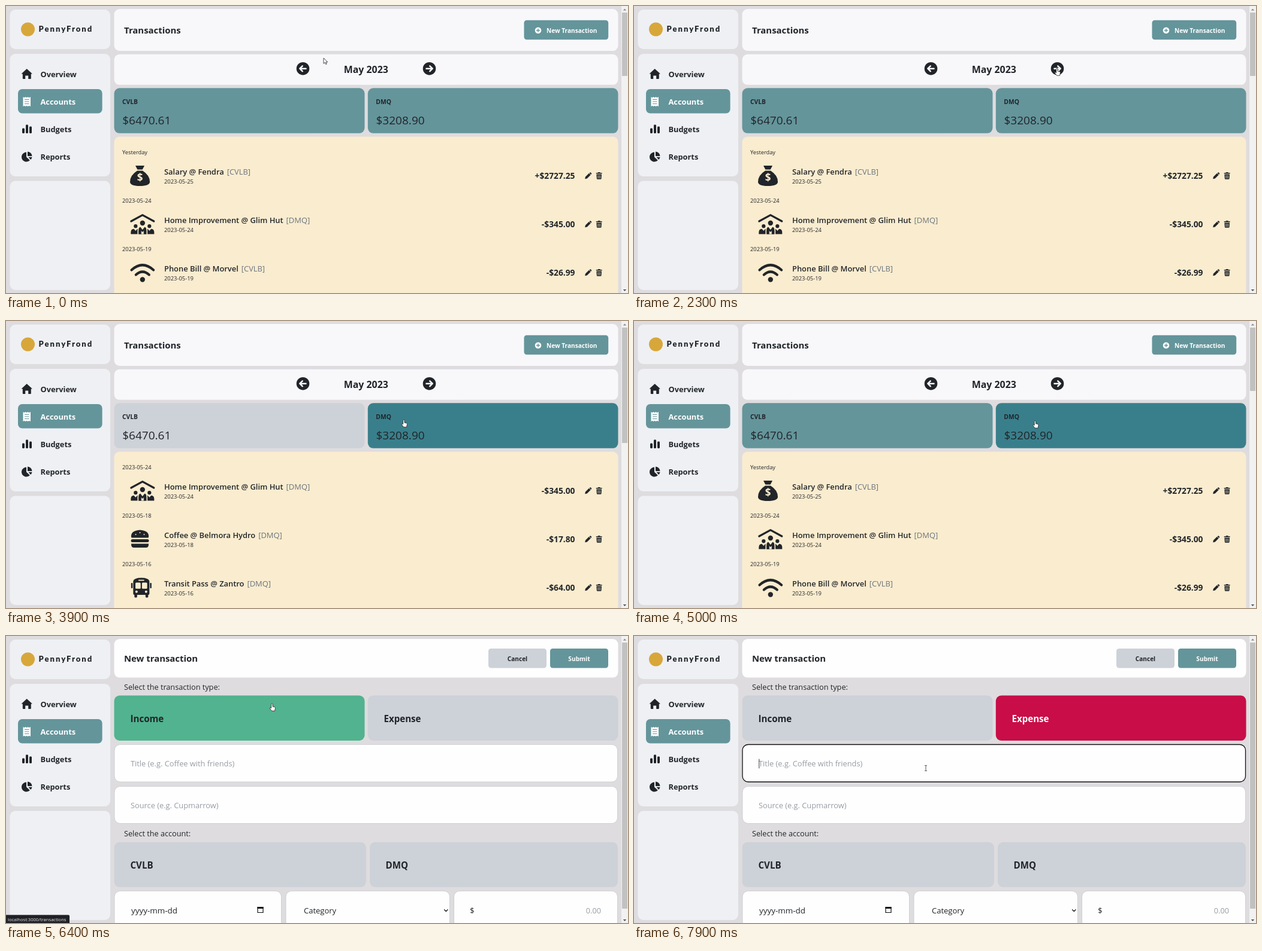
Recreate the animation shown at these times as an HTML page. Size 1038 by 480 pixels, loop 8000 ms.

```html
<!DOCTYPE html>
<html lang="en">
<head>
<meta charset="utf-8">
<title>Budget tracker</title>
<style>
  html, body { margin: 0; width: 100%; height: 100%; overflow: hidden; background: #dedcde; }
  svg { display: block; width: 1038px; height: 480px; }
  text { font-family: "Open Sans", "Noto Sans", sans-serif; white-space: pre; }
  .brand { font-family: Lato, sans-serif; letter-spacing: 2px; }
</style>
</head>
<body>
<svg id="stage" viewBox="0 0 1038 480" xmlns="http://www.w3.org/2000/svg"></svg>
<script>
const LOOP = 8000, STEP = 100;
const INK = '#212529', TEAL = '#64959b', DEEP = '#397f8b', GREY = '#cdd1d8',
      PANEL = '#eef0f4', HEAD = '#f8f8fb', CREAM = '#faeccf', MUTED = '#6c757d',
      GREEN = '#51b38f', RED = '#c80d48', HINT = '#989da4';
const BANK_A = 'CVLB', BANK_B = 'DMQ';
// Shared column edges
const LEFT = 180.5, MID_L = 598.5, MID_R = 603.8, RIGHT = 1021.5;

// Drawing helpers
const box = (x, y, x2, y2, r, fill, more = '') =>
  `<rect x="${x}" y="${y}" width="${x2 - x}" height="${y2 - y}" rx="${r}" fill="${fill}" ${more}/>`;
const text = (x, y, size, str, { w = 400, fill = INK, end = '', more = '' } = {}) =>
  `<text x="${x}" y="${y}" font-size="${size}" font-weight="${w}" fill="${fill}" ${end && `text-anchor="${end}"`} ${more}>${str}</text>`;
const bold = (x, y, size, str, opt = {}) => text(x, y, size, str, { w: 700, ...opt });
const path = (d, fill = INK, more = '') => `<path d="${d}" fill="${fill}" ${more}/>`;
const line = (d, width, color = INK) =>
  path(d, 'none', `stroke="${color}" stroke-width="${width}" stroke-linecap="round" stroke-linejoin="round"`);
const dot = (x, y, r, fill = INK) => `<circle cx="${x}" cy="${y}" r="${r}" fill="${fill}"/>`;
const at = (x, y, body) => `<g transform="translate(${x} ${y})">${body}</g>`;
const layer = (id, body) => `<g id="${id}">${body}</g>`;

const sidePerson = x => dot(x, 3.2, 3.1) + path(`M${x - 8} 16.5V13.5Q${x - 8} 8 ${x - 3} 7.7L${x} 11 ${x + 3} 7.7Q${x + 8} 8 ${x + 8} 13.5V16.5z`);

// Category icons, centred on the origin
const icons = {
  bag: path('M-7.5-17H7.5L4.2-10.5H-4.2z') +
    path('M-4.5-8.5H4.5Q16.5-1 16.5 10Q16.5 17-.5 17Q-16.5 17-16.5 10Q-16.5-1-4.5-8.5z') +
    bold(0, 9.2, 17, '$', { fill: CREAM, end: 'middle' }),
  home: at(4.3, 0, line('M-19-5L0-15.3 19-5', 3.2) + sidePerson(-11.5) + sidePerson(11.5) +
    dot(0, -2, 4.2) +
    path('M-7.5 17.5V11Q-7.5 4-3.2 3.7L0 8 3.2 3.7Q7.5 4 7.5 11V17.5z', INK, `stroke="${CREAM}" stroke-width="1.6"`) +
    path('M-2 11L0 13.2 2 11V16.5H-2z', CREAM)),
  wifi: at(4.3, 0, line('M-18.3-4.5Q0-21 18.3-4.5', 4.2) + line('M-11 3.5Q0-6.5 11 3.5', 4.2) + dot(0, 11.5, 4.2)),
  burger: path('M-14.5-3.5Q-16-14.5 0-15.5Q16-14.5 14.5-3.5Q14.5-2.5 13-2.5H-13Q-14.5-2.5-14.5-3.5z') +
    [[-7, -8], [0, -11], [7, -8]].map(p => dot(...p, 1, CREAM)).join('') +
    box(-15, 0, 15, 5, 2.5, INK) + path('M-14.5 7.5H14.5V9Q14.5 14 10 14H-10Q-14.5 14-14.5 9z'),
  bus: at(2.3, 0, path('M-13.5-11Q-12-16.5 0-16.5T13.5-11V10Q13.5 12 11.5 12H-11.5Q-13.5 12-13.5 10z') +
    box(-17, -8, -14.5, 1, 1.2, INK) + box(14.5, -8, 17, 1, 1.2, INK) +
    box(-11.5, 10, -7, 16.5, 1.5, INK) + box(7, 10, 11.5, 16.5, 1.5, INK) +
    box(-5, -13.3, 5, -11.5, .9, CREAM) + box(-9.8, -8.5, -1.1, 1.8, 1.5, CREAM) + box(1.1, -8.5, 9.8, 1.8, 1.5, CREAM) +
    dot(-8, 6.7, 2, CREAM) + dot(8, 6.7, 2, CREAM))
};
const pencil = path('M-5.3 5.3L-4.6 1.8 1.4-4.2 4.2-1.4-1.8 4.6z') + path('M2-4.8L3.2-5.6Q4-6 5-5T5.6-3.2L4.8-2z');
const trash = box(-5, -5, 5, -3.4, .6, INK) + box(-1.9, -6, 1.9, -4, .6, INK) +
  path('M-4.3-2.5H4.3L3.8 4.8Q3.7 5.8 2.8 5.8H-2.8Q-3.7 5.8-3.8 4.8z') +
  line('M-2-.5V4M0-.5V4M2-.5V4', .7, CREAM);

// Transactions: [icon, title, bank, amount], grouped by day
const salary = ['bag', 'Salary @ Fendra', BANK_A, '+$2727.25'];
const repair = ['home', 'Home Improvement @ Glim Hut', BANK_B, '-$345.00'];
const phone = ['wifi', 'Phone Bill @ Morvel', BANK_A, '-$26.99'];
const coffee = ['burger', 'Coffee @ Belmora Hydro', BANK_B, '-$17.80'];
const blender = ['home', 'Blender @ Trevask', BANK_A, '-$78.00'];
const pass = ['bus', 'Transit Pass @ Zantro', BANK_B, '-$64.00'];
const pay = ['bag', 'Salary @ Fendra', BANK_B, '+$2835.25'];
const lists = {
  may: [['Yesterday', salary], ['2023-05-24', repair], ['2023-05-19', phone]],
  april: [['2023-04-18', coffee], ['2023-04-17', blender, pay], ['2023-04-16']],
  bankA: [['Yesterday', salary], ['2023-05-19', phone], ['2023-05-17', blender]],
  bankB: [['2023-05-24', repair], ['2023-05-18', coffee], ['2023-05-16', pass]]
};
const thumbEnd = { may: 117, april: 131, bankA: 150, bankB: 204, form: 456 };

function drawRow(y, date, [icon, title, bank, amount]) {
  return at(223.5, y, icons[icon]) +
    text(264, y - 2, 12.9, `${title}<tspan dx="5" font-weight="400" fill="${MUTED}">[${bank}]</tspan>`, { w: 600 }) +
    text(264, y + 13, 9.4, date) +
    bold(949.5, y + 5, 13.8, amount, { end: 'end' }) +
    at(971.5, y, pencil) + at(989.7, y, trash);
}
function drawList(groups) {
  let y = 245, out = '';
  for (const [label, ...rows] of groups) {
    out += text(194, y + 3.3, 9.3, label);
    rows.forEach((row, i) => out += drawRow(y + 39 + i * 62, label === 'Yesterday' ? '2023-05-25' : label, row));
    y += 19 + rows.length * 62;
  }
  return out;
}

const roundArrow = (x, dir) => at(x, 104.7, dot(0, 0, 10.8) +
  `<g transform="scale(${dir} 1)">${line('M-5 0H5M.8-4.4L5.2 0 .8 4.4', 2.5, HEAD)}</g>`);
const card = (id, x, x2, name, sum) => box(x, 137.3, x2, 212.8, 9, TEAL, `id="${id}"`) +
  bold(x + 13.5, 163.5, 10.3, name) + text(x + 13.7, 198, 19, sum);
const field = (x, y, x2, y2, id = '') =>
  box(x + .5, y + .5, x2 - .5, y2 - .5, 9.5, '#fefefe', `stroke="#ced1d6" ${id && `id="${id}"`}`);

const sidebar =
  box(6.5, 6, 174, 72, 9, PANEL) + box(6.5, 80, 174, 285, 9, PANEL) + box(6.5, 292.5, 174, 475, 9, PANEL) +
  dot(36.5, 39, 11.5, '#d8a73a') +
  text(54.5, 42.5, 13, 'PennyFrond', { w: 900, more: 'class="brand"' }) +
  box(20, 139, 160.6, 179.6, 7, TEAL) +
  path('M34.7 105L44 113.5H41.8V121Q41.8 122 40.8 122H37.2V116.5H32.2V122H28.8Q27.8 122 27.8 121V113.5H25.5z') +
  path('M28.5 152l2 1.2 2-1.2 2 1.2 2-1.2 2 1.2 2.5-1.2V168l-2.5-1.2-2 1.2-2-1.2-2 1.2-2-1.2-2 1.2z', '#fff') +
  line('M31.5 156.5H38M31.5 160H38M31.5 163.5H38', 1.2, TEAL) +
  box(27, 204.5, 31, 213, 1.4, INK) + box(33, 198.5, 37, 213, 1.4, INK) + box(39, 201.5, 43, 213, 1.4, INK) +
  path('M34 244.5V252.5L39.8 258A8 8 0 1 1 34 244.5z') + path('M36 243.5A8 8 0 0 1 43.5 251H36z') +
  path('M37.5 252.7H43.5A8 8 0 0 1 41.2 257z') +
  ['Overview', 'Accounts', 'Budgets', 'Reports'].map((s, i) =>
    bold(57.5, 118.7 + 46 * i, 12.8, s, { fill: i === 1 ? '#fff' : INK })).join('');

const ledger =
  box(LEFT, 5, RIGHT, 75, 9, HEAD) + bold(197, 46, 14.9, 'Transactions') +
  box(864.5, 23.8, 1005.2, 56.2, 4.5, TEAL, 'id="add"') + dot(888, 40.7, 5.3, '#fff') +
  line('M885.5 40.7H890.5M888 38.2V43.2', 1.4, TEAL) +
  bold(902, 44.6, 10.1, 'New Transaction', { fill: '#fff' }) +
  box(LEFT, 80.8, RIGHT, 131.8, 9, HEAD) + roundArrow(495.5, -1) + roundArrow(706.5, 1) +
  bold(600.8, 112.4, 15.9, '', { end: 'middle', more: 'id="month"' }) +
  card('cardA', LEFT, MID_L, BANK_A, '$6470.61') + card('cardB', MID_R, RIGHT, BANK_B, '$3208.90') +
  box(LEFT, 218.6, RIGHT, 500, 9, CREAM) +
  Object.keys(lists).map(k => layer(k, drawList(lists[k]))).join('');

const form =
  box(LEFT, 5, RIGHT, 69.6, 9, '#fefefe') + bold(197, 43.4, 14.9, 'New transaction') +
  box(805, 21, 902, 53.5, 4.5, GREY) + bold(853.5, 41.5, 10.1, 'Cancel', { end: 'middle' }) +
  box(908, 21, 1005, 53.5, 4.5, TEAL) + bold(956.5, 41.5, 10.2, 'Submit', { end: 'middle', fill: '#fff' }) +
  text(197, 90, 12.7, 'Select the transaction type:') +
  box(LEFT, 99.5, MID_L, 175, 9, GREY, 'id="income"') + bold(207.5, 143.8, 15.1, 'Income') +
  box(MID_R, 99.5, RIGHT, 175, 9, GREY, 'id="expense"') + bold(630.5, 143.8, 15.1, 'Expense', { more: 'id="expenseText"' }) +
  field(LEFT, 181, 1021, 244.5, 'title') + text(208, 218.3, 12.8, 'Title (e.g. Coffee with friends)', { fill: HINT }) +
  layer('caret', line('M208.8 206V221', .9)) +
  field(LEFT, 251, 1021, 314) + text(208, 288, 12.8, 'Source (e.g. Cupmarrow)', { fill: HINT }) +
  text(197, 335, 12.7, 'Select the account:') +
  box(LEFT, 344.8, 601, 420, 9, GREY) + bold(207.5, 388.5, 15.1, BANK_A) +
  box(607, 344.8, 1021, 420, 9, GREY) + bold(633.5, 388.5, 15.1, BANK_B) +
  field(LEFT, 426, 460, 500) + text(209, 463.5, 13.4, 'yyyy-mm-dd') +
  path('M420 453.5H429V462.5H420z', 'none', 'stroke="#111" stroke-width="1.2"') + box(419.5, 453, 429.5, 456, 0, '#111') +
  field(466.5, 426, 741, 500) + text(497, 463.5, 13, 'Category') + line('M731.5 457.7L734.3 460.5 737 457.7', 1.4) +
  field(747, 426, 1021, 500) + text(774, 463.5, 13.4, '$') + text(993, 463.5, 12.7, '0.00', { end: 'end', fill: HINT });

const scrollbar = box(1027, 0, 1038, 480, 0, '#f1f1f1') + box(1028, 11, 1037, 117, 0, '#c1c1c1', 'id="thumb"') +
  path('M1029.8 7.5L1032.5 4.5 1035.2 7.5z', '#8a8a8a') + path('M1029.8 474L1032.5 477 1035.2 474z', '#505050');
const status = layer('status', box(-4, 466.5, 122, 490, 2, '#202124', 'id="statusBox"') +
  text(3, 476.8, 7.6, '', { fill: '#e8eaed', more: 'id="statusText"' }));
const outline = 'stroke="#222" stroke-width=".8" stroke-linejoin="round"';
const pointers =
  layer('arrow', path('M0 0V9.3L2.2 7.4 3.8 10.6 5.3 9.9 3.8 6.8H6.7z', '#fff', outline)) +
  layer('hand', path('M-.4.5a1.2 1.2 0 0 1 2.4 0V4L5.4 4.8Q6.6 5.1 6.4 6.5L5.6 11.3H.6L-2.8 7.1Q-3.1 5.7-1.9 5.8L-.4 6.8z', '#fff', outline)) +
  layer('beam', line('M-1.6-4.5H-.4L0-4 .4-4.5H1.6M0-4V4M-1.6 4.5H-.4L0 4 .4 4.5H1.6', .9, '#444'));

document.getElementById('stage').innerHTML = box(0, 0, 1038, 480, 0, '#dedcde') + sidebar +
  layer('ledger', ledger) + layer('form', form) + scrollbar + status + layer('pointer', pointers);

const $ = Object.fromEntries([...document.querySelectorAll('#stage [id]')].map(e => [e.id, e]));
const show = (id, on) => $[id].setAttribute('display', on ? 'inline' : 'none');
const fill = (id, color) => $[id].setAttribute('fill', color);

// Pointer hot spot: time, x, y
const moves = [
  [0, 530, 87], [500, 497, 104], [1000, 497, 104], [1400, 587, 107], [1800, 705, 105], [2400, 705, 105],
  [3100, 511, 158], [3500, 511, 160], [3800, 655, 165], [3900, 663, 166], [4900, 668, 168], [5300, 672, 166],
  [6000, 884, 43], [6100, 881, 42], [6200, 872, 43], [6400, 443, 114], [6600, 446, 117], [7000, 640, 132],
  [7200, 648, 134], [7600, 492, 215], [7900, 487, 221]
];
// View changes on click
const views = [[0, 'may'], [1000, 'april'], [2200, 'may'], [3300, 'bankA'], [3900, 'bankB'], [4900, 'may'], [6200, 'form']];

function pointerAt(t) {
  const i = moves.findIndex(m => m[0] > t);
  if (i < 0) return moves[moves.length - 1].slice(1);
  const [t0, x0, y0] = moves[i - 1], [t1, x1, y1] = moves[i];
  const p = (t - t0) / (t1 - t0), e = p * p * (3 - 2 * p);
  return [x0 + (x1 - x0) * e, y0 + (y1 - y0) * e];
}

function render(t) {
  const view = views.filter(v => v[0] <= t).pop()[1], isForm = view === 'form';
  const [x, y] = pointerAt(t);
  const over = (a, b, c, d) => x >= a && y >= b && x <= c && y <= d;
  const overA = !isForm && over(LEFT, 137, MID_L, 213), overB = !isForm && over(MID_R, 137, RIGHT, 213);
  const overAdd = !isForm && over(865, 24, 1005, 56);
  const overArrow = !isForm && [495.5, 706.5].some(cx => Math.hypot(x - cx, y - 104.7) < 11);
  const overForm = isForm && (over(805, 21, 1005, 53) || over(LEFT, 99, MID_L, 175) || over(MID_R, 99, RIGHT, 175));
  const overText = isForm ? over(LEFT, 181, 1021, 244) || over(197, 80, 358, 94) : over(561, 97, 640, 117);

  show('ledger', !isForm);
  show('form', isForm);
  Object.keys(lists).forEach(k => show(k, k === view));
  $.month.textContent = view === 'april' ? 'April 2023' : 'May 2023';
  fill('cardA', overA ? DEEP : view === 'bankB' ? GREY : TEAL);
  fill('cardB', overB ? DEEP : view === 'bankA' ? GREY : TEAL);
  fill('add', overAdd ? DEEP : TEAL);
  $.thumb.setAttribute('height', thumbEnd[view] - 11);

  const expense = t >= 7100, focus = t >= 7600;
  fill('income', t >= 6400 && !expense ? GREEN : GREY);
  fill('expense', expense ? RED : GREY);
  fill('expenseText', expense ? '#fff' : INK);
  $.title.setAttribute('stroke', focus ? '#111' : '#ced1d6');
  $.title.setAttribute('stroke-width', focus ? 1.3 : 1);
  show('caret', focus);

  show('status', overAdd || (isForm && t < 6600));
  $.statusText.textContent = 'localhost:3000/transactions' + (isForm ? '' : '/add');
  $.statusBox.setAttribute('width', isForm ? 110 : 126);

  const shape = overA || overB || overAdd || overArrow || overForm ? 'hand' : overText ? 'beam' : 'arrow';
  ['arrow', 'hand', 'beam'].forEach(s => show(s, s === shape));
  $.pointer.setAttribute('transform', `translate(${x.toFixed(1)} ${y.toFixed(1)})`);
}

const start = performance.now();
function tick(now) {
  const t = Math.max(0, now - start) % LOOP;
  render(Math.floor(t / STEP) * STEP);
  requestAnimationFrame(tick);
}
render(0);
requestAnimationFrame(tick);
</script>
</body>
</html>
```
